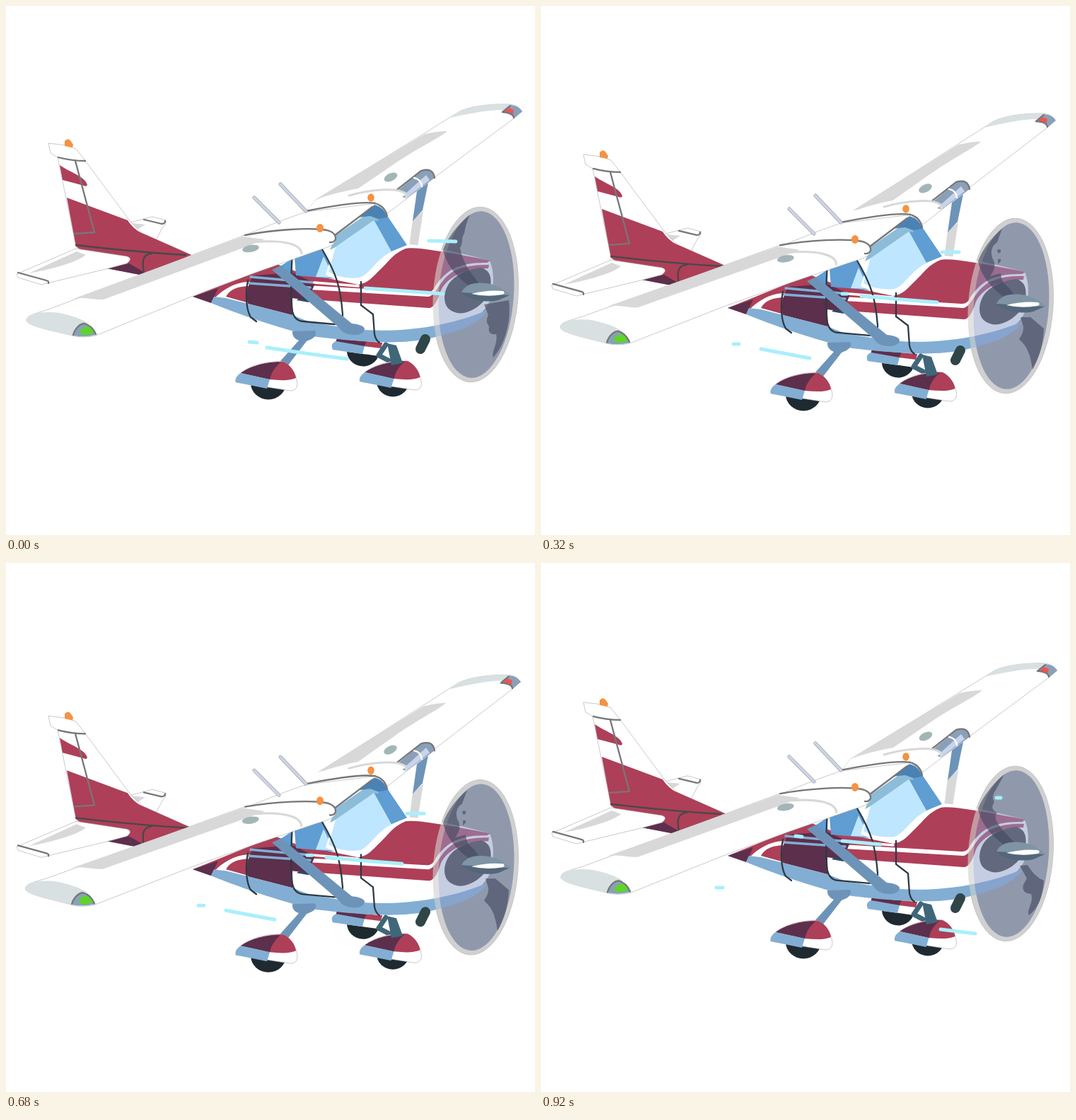
An HTML page that plays this animation: 748 by 748 pixels, repeating every 0.96 s.

```html
<!DOCTYPE html>
<html lang="en">
<head>
<meta charset="utf-8">
<title>Light aircraft</title>
<style>
html, body { margin: 0; width: 100%; height: 100%; overflow: hidden; background: #fff }
svg { display: block; width: 100%; height: 100% }
.white { fill: #fff }
.red { fill: #ae3f58 }
.plum { fill: #5c2f4c }
.shade { fill: #82aed4 }
.steel { fill: #6d94b8 }
.grey { fill: #d8d8d8 }
.tip { fill: #d8e0e2 }
.cap { fill: #8aa0b8 }
.glass { fill: #5f9dd3 }
.pale { fill: #bfe6ff }
.black { fill: #1f2a30 }
.teal { fill: #40667a }
.lamp { fill: #f59243 }
.pad { fill: #a3b6b7 }
.blade { fill: #434a60; opacity: .62 }
.edge { stroke: #a5a5a5; stroke-width: .6 }
.line { fill: none; stroke: #777; stroke-width: 2.3; stroke-linecap: round; stroke-linejoin: round }
.dark { stroke: #2e3a44 }
.wind { fill: none; stroke: #a9effc; stroke-width: 5; stroke-linecap: round }
</style>
</head>
<body>
<svg viewBox="0 0 748 748">
<defs>
  <g id="pant">
    <path class="white edge" d="M325 532Q323 525 332 519C345 507 375 501 392 503C402 507 411 521 412 534Q412 544 402 544Z"/>
    <path class="red" d="M332 519C348 507 375 502 392 503C402 507 409 518 410 526Q400 531 373 528Z"/>
    <path class="plum" d="M332 519C348 507 375 503 388 504C379 512 375 519 373 528Z"/>
    <path class="shade" d="M325 532Q323 525 332 519L373 528L369 541Z"/>
  </g>
</defs>
<g id="plane">
  <g id="farWing">
    <path class="white edge" d="M438 274L530 218L640 150C655 141 690 138 712 139Q724 140 730 149L718 159L605 243L541 292L424 291Z"/>
    <path class="grey" d="M440 273L530 218L592 181Q610 177 624 177C612 187 580 202 548 224L498 258Q465 264 440 273Z"/>
    <path class="tip" d="M640 150C655 141 690 138 714 139L704 147C685 146 655 152 627 158Z"/>
    <path class="cap" d="M714 140Q725 141 730 149L718 159Q717 151 701 150Z"/>
    <path fill="#f4524d" d="M704 150L711 144L718 147L717 153Q711 149 704 150Z"/>
    <path class="line" d="M713 141L702 150Q717 151 718 158"/>
    <ellipse class="pad" cx="544" cy="242" rx="10" ry="5.5" transform="rotate(-25 544 242)"/>
  </g>

  <path class="grey" d="M575 302L590 290L582 341H570Z"/>
  <path class="steel" d="M581 262L597 250L589 289L575 304Z"/>
  <path class="cap" d="M549 265L588 233Q604 229 606 243L566 272Z"/>
  <path fill="#c8d4ec" d="M563 267L594 239L599 246L567 271Z"/>
  <path class="line" d="M550 262L587 233Q604 228 606 243"/>
  <path class="line" style="stroke:#fff" d="M577 243Q587 245 588 255"/>

  <path class="white" d="M424 291C470 281 505 276 522 278C533 281 560 272 566 266C550 255 515 258 488 264L438 274Z"/>
  <path class="line" style="stroke:#d8d8d8;stroke-width:3" d="M485 268C520 258 555 257 565 265L566 271"/>

  <path class="white edge" d="M176 306L207 298L226 303Q227 309 222 312L212 331L180 318Z"/>
  <path class="grey" d="M178 307L197 309L184 317Z"/>
  <path class="line" d="M195 302L220 308Q225 308 225 304"/>
  <path class="white edge" d="M73 214L113 220L176 305L192 321L262 352L195 381L143 371L99 340Z"/>
  <path class="white edge" d="M60 194L85 197L99 202L113 220L73 214L63 208Z"/>
  <path class="red" d="M76 225C90 235 112 241 115 253Q114 256 110 254L80 246Z"/>
  <path class="red" d="M86 271L172 303C178 312 185 318 192 321L262 352L195 381L143 371L99 340Z"/>
  <path class="plum" d="M143 371L174 364L200 379L195 381Z"/>
  <path class="lamp" d="M83 198V191Q87 186 91 190L95 196L94 200Z"/>
  <path class="line" d="M74 214Q92 219 112 219M98 219L125 320L97 322"/>
  <path class="white edge" d="M99 343L15 379L17 384L50 394L145 371L171 364Q180 357 171 354Z"/>
  <path class="grey" d="M32 378L100 347L113 352C100 363 60 373 32 378Z"/>
  <path class="line" d="M17 377L57 388Q61 389 60 392"/>
  <path class="line" style="stroke:#484848" d="M99 338C150 344 200 349 254 352M206 350C191 351 193 365 195 377"/>

  <ellipse class="black" cx="505" cy="487.500" rx="23" ry="22"/>
  <path class="white" d="M462 486Q458 476 468 470H534L527 495Z"/>
  <path class="red" d="M468 470H534L530 484L466 476Z"/>
  <path class="plum" d="M468 470H512L506 482L466 477Z"/>
  <path class="shade" d="M462 486Q458 477 467 474L507 481L504 492Z"/>

  <ellipse cx="664" cy="408" rx="60" ry="124" fill="#d1d1d1" class="edge" transform="rotate(4 664 408)"/>
  <ellipse cx="665" cy="408" rx="53" ry="118" fill="#969792" transform="rotate(4 665 408)"/>

  <path class="white" d="M262 411L380 360L520 290L566 337Q600 338 684 360Q692 380 687 405C685 436 640 462 590 470L530 476L440 468L290 420Z"/>
  <path class="red" d="M264 411L380 364L412 376L498 394C525 390 530 358 565 343Q580 339 685 360L680 363C640 362 622 374 607 396Q603 406 594 405L342 390C322 391 306 402 296 412Z"/>
  <path class="red" d="M311 411C316 401 328 396 345 396L597 411C610 409 612 386 635 374Q655 365 683 366L682 371C650 371 625 382 615 402Q607 428 597 427L500 420L405 413V437Z"/>
  <path class="plum" d="M264 411L300 399L290 420Z"/>
  <path class="plum" d="M350 381L405 377L437 392L427 416L405 413V437L342 421Q338 399 350 381Z"/>
  <path class="shade" d="M290 420L294 411L311 413L405 437L430 447L480 455C530 463 610 460 681 430C670 450 640 460 600 470C560 478 520 477 440 468C400 460 340 440 290 420Z"/>
  <path class="line" style="stroke:#82aed4;stroke-width:3.6" d="M346 383L434 391M344 392L430 398"/>
  <path class="line" style="stroke:#fff;stroke-width:3.6" d="M436 391L498 396"/>

  <path class="glass" d="M380 373L405 357V380L390 381ZM408 356L446 342L467 386L410 381Z"/>
  <path class="pale" d="M449 354L464 384L438 383Z"/>
  <path class="white" d="M452 380L468 328L524 282L540 296L569 339C545 348 535 375 505 391Q475 393 452 380Z"/>
  <path class="pale" d="M456 376L468 334L524 298L546 347C525 356 515 379 500 384Q475 387 456 376Z"/>
  <path class="glass" d="M522 284L540 298L567 338L545 347L520 302Z"/>
  <path fill="#8cbcd8" d="M458 345L467 324L522 286L527 304L520 303L464 342Z"/>
  <path fill="#4a82b4" d="M498 299L520 281Q535 284 539 299L526 301L515 297Z"/>
  <path class="line" d="M522 279Q536 283 539 297"/>

  <path class="line dark" d="M405 348C403 380 402 410 405 432Q408 445 420 446L464 450Q476 449 476 436C473 398 468 380 447 344M342 388C338 410 340 430 346 440L354 446"/>
  <path class="line dark" d="M502 390V423L519 436L521 464Q523 473 528 476"/>
  <path fill="#2d4a66" d="M411 416Q414 412 419 414L430 416L428 419Z"/>

  <path class="white edge" d="M335 325L388 304L424 291L524 279L466 322L455 332Z"/>
  <path class="line" d="M424 290C470 281 505 276 522 279M464 325L518 284"/>
  <ellipse class="lamp" cx="516" cy="271" rx="4.8" ry="5.8"/>
  <path class="line" style="stroke:#989ca5;stroke-width:5" d="M351 271L386 306M388 252L424 290"/>
  <path class="line" style="stroke:#cdd4e4;stroke-width:3.8" d="M351 271L386 306M388 252L424 290"/>

  <g id="nearWing">
    <path class="white edge" d="M29 445C28 437 45 434 60 429L335 325C380 316 430 313 455 316Q468 321 466 332C463 339 455 341 440 346L350 378L262 411L127 466C110 470 95 467 90 465C60 458 31 452 29 445Z"/>
    <path class="grey" d="M95 414L335 326L366 330L338 341L138 415C125 416 110 411 95 414Z"/>
    <path class="tip" d="M29 445C28 432 60 432 75 434C95 438 108 443 117 449C105 450 98 455 95 466C60 459 31 452 29 445Z"/>
    <path class="cap" d="M95 466C98 455 105 449 111 449C118 451 124 457 127 465Q112 469 95 466Z"/>
    <path fill="#5ed42b" d="M104 460Q112 450 120 455L127 461Q118 466 108 465Z"/>
    <path class="line" d="M95 465C98 455 105 449 111 449C118 451 124 457 127 464"/>
    <path class="line" style="stroke:#d8d8d8;stroke-width:3.2" d="M350 334C390 330 417 336 418 350"/>
    <path class="line" d="M338 324C380 316 430 313 453 317Q467 320 466 330Q463 335 458 334"/>
    <ellipse class="pad" cx="346" cy="343" rx="12" ry="5" transform="rotate(-10 346 343)"/>
  </g>
  <ellipse class="lamp" cx="444" cy="314" rx="5" ry="6"/>

  <path class="steel" d="M376 373L389 367L489 449Q508 451 507 458Q504 466 490 465Q476 464 471 455Z"/>
  <path class="steel" d="M405 460L437 459Q441 466 432 471L425 474L398 509L387 503L414 473Q404 469 405 460Z"/>
  <ellipse class="black" cx="371" cy="533" rx="25" ry="23.500"/>
  <use href="#pant"/>

  <path class="line" style="stroke:#40667a;stroke-width:7" d="M537 479L527 494L548 505"/>
  <ellipse class="black" cx="547" cy="530.500" rx="23" ry="22"/>
  <use href="#pant" x="175.5" y="-1"/>
  <path class="teal" d="M539 477L552 480L561 505L545 508Z"/>
  <path d="M593 471L586 485" stroke="#2f4548" stroke-width="14" stroke-linecap="round"/>

  <path fill="#d0d0d0" fill-opacity=".62" fill-rule="evenodd" transform="rotate(4 664 408)" d="M604 408a60 124 0 1 0 120 0a60 124 0 1 0-120 0M612 408a53 118 0 1 1 106 0a53 118 0 1 1-106 0"/>
  <ellipse cx="665" cy="408" rx="53" ry="118" fill="#8c9bc8" fill-opacity=".5" transform="rotate(4 665 408)"/>
  <path fill="#62687e" d="M620 412C622 385 645 374 672 370C685 374 687 384 685 400C678 425 650 437 638 434Q620 430 620 412Z"/>
  <g class="phase">
    <path class="blade" d="M656 295C640 308 624 328 618 345C622 366 640 388 665 402L668 391C656 377 645 360 642 342C647 335 643 328 648 322Q650 308 656 295Z"/>
    <path class="blade" d="M676 422L711 416C715 445 705 480 689 497C686 488 696 478 693 464Q681 466 683 453Q677 446 682 437Z"/>
  </g>
  <g class="phase">
    <path class="blade" d="M655 296C640 308 624 328 618 345C622 366 640 388 665 402L668 391C656 377 636 360 645 350Q634 345 641 335Q636 327 643 318Z"/>
    <path class="blade" d="M677 425L688 424Q698 441 711 446C710 470 702 486 690 495C686 487 697 478 693 465Q679 464 682 452L687 443Z"/>
  </g>
  <g class="phase">
    <path class="blade" d="M652 299C638 310 624 328 618 345C622 366 640 388 665 402L668 391C660 377 652 380 650 362L635 366Q646 352 638 340Q634 325 645 318Z"/>
    <path class="blade" d="M678 424L692 424L711 440C710 465 704 482 695 498C692 478 689 467 676 455Q683 445 682 437Z"/>
    <path class="blade" d="M645 329q6-3 5 3q-4 4-5-3M646 342q5-2 4 3l-4 4z"/>
  </g>
  <path fill="#7f94a4" d="M644 405C650 390 675 388 697 397L714 408L696 416Z"/>
  <path fill="#53677a" d="M644 405L712 409L696 416C675 421 650 413 644 405Z"/>
  <path class="white" d="M658 407Q680 401 703 403Q707 406 702 408Q680 412 658 407Z"/>

  <g class="phase wind">
    <path d="M598 332L636 333M508 399L618 407M344 475L355 476M369 483L430 492L482 499"/>
  </g>
  <g class="phase wind">
    <path d="M644 329H650M360 383L369 384M426 390L480 395M248 456H257M565 515L614 521"/>
  </g>
  <g class="phase wind">
    <path d="M567 332H591M426 391H433M453 394L510 399L560 403M272 462H280M311 469L380 482"/>
  </g>
</g>
</svg>
<script>
const byId = id => document.getElementById(id);
const phases = [...document.querySelectorAll('.phase')];
const LOOP = 960, TICK = 40, DROP = 24;

const easeInOut = u => u < .5 ? (2 * u) ** 2.6 / 2 : 1 - (2 - 2 * u) ** 2.6 / 2;
// Sinks for 14 ticks, then rises; the loop cuts in before the rise ends.
const bob = tick => DROP * (tick < 14 ? easeInOut(tick / 14) : 1 - easeInOut((tick - 14) / 12.7));
const turn = (id, angle, x, y) => byId(id).setAttribute('transform', `rotate(${angle} ${x} ${y})`);

function draw() {
  const time = performance.now() % LOOP;
  const step = time < 480 ? 2 * TICK : TICK;
  const tick = Math.floor(time / step) * step / TICK;
  const phase = Math.floor(tick / 3) % 3;
  byId('plane').setAttribute('transform', `translate(0 ${bob(tick)})`);
  turn('nearWing', .42 * phase, 455, 330);
  turn('farWing', phase === 2 ? -1 : 0, 540, 270);
  phases.forEach((group, i) => group.style.display = i % 3 === phase ? '' : 'none');
  requestAnimationFrame(draw);
}
draw();
</script>
</body>
</html>
```
